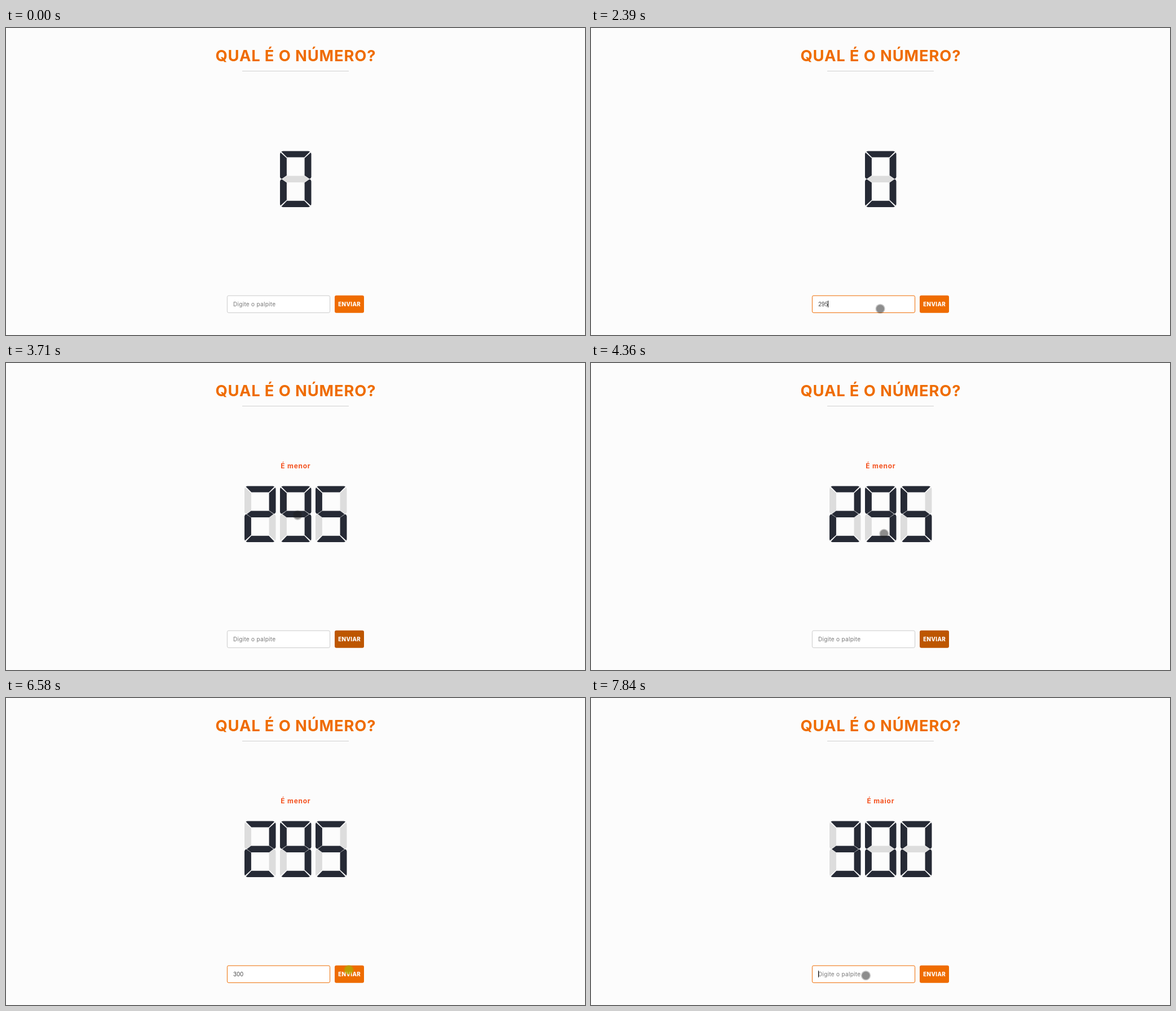
These frames come from a looping animation (1027 by 545 pixels, 8 s). An HTML page with a canvas:

```html
<!DOCTYPE html>
<html lang="pt">
<head>
<meta charset="utf-8">
<title>Qual é o número?</title>
<style>
html, body { margin: 0; width: 100%; height: 100%; overflow: hidden; background: #fcfcfc; }
canvas { display: block; width: 1027px; height: 545px; }
</style>
</head>
<body>
<canvas id="stage"></canvas>
<script>
const W = 1027, H = 545, LOOP = 8000, FADE = 150, CLICK = 75, BLINK = 500;
const canvas = document.getElementById('stage');
const ctx = canvas.getContext('2d');
const ratio = window.devicePixelRatio || 1;
canvas.width = W * ratio;
canvas.height = H * ratio;

const ORANGE = [239, 108, 0], DARK_ORANGE = [189, 86, 0], GREY = [203, 203, 203];
const SEG_ON = '#262a35', SEG_OFF = '#dddddd';

// Each guess: click the field, type, press the button, release to send.
const GUESSES = [
  { focus: 1040, type: 1700, step: 120, press: 2830, send: 2930, text: '295', hint: 'É menor' },
  { focus: 4880, type: 5370, step: 140, press: 6580, send: 6660, text: '300', hint: 'É maior' },
  { focus: 7640, type: LOOP, step: 120, press: LOOP, send: LOOP, text: '', hint: '' }
];

// Pointer moves: where each one ends and how far it bows from a straight line.
const ENTRY = { x: 817, y: 528 };
const MOVES = [
  { start: 290, end: 1160, x: 492, y: 501.5, bowY: -88 },
  { start: 2380, end: 2520, x: 606, y: 485 },
  { start: 2670, end: 3200, x: 603, y: 492 },
  { start: 3430, end: 3990, x: 499, y: 191.5, bowY: 90 },
  { start: 4240, end: 4960, x: 472, y: 494, bowX: 66 },
  { start: 6120, end: 6260, x: 610, y: 477 },
  { start: 6420, end: 6560, x: 608, y: 482.5 },
  { start: 7040, end: 7400, x: 487.5, y: 492.7, bowY: 8 }
];

const GLYPHS = { 0: 'abcdef', 2: 'abged', 3: 'abgcd', 5: 'afgcd', 9: 'abcdfg' };
const DIGIT_W = 55.5, DIGIT_H = 99.5, PITCH = 63;
const TOP = [[2.4, 1], [5, 0], [50.5, 0], [53.1, 1], [43.2, 11.2], [12.3, 11.2]];
const SIDE = [[0.9, 2.6], [11.9, 12.7], [11.9, 43.3], [3.3, 49.3], [1.2, 48.6], [0, 46], [0, 5]];
const MID = [[4, 49.75], [11.7, 44], [43.8, 44], [51.5, 49.75], [43.8, 55.5], [11.7, 55.5]];
const flipX = pts => pts.map(([x, y]) => [DIGIT_W - x, y]);
const flipY = pts => pts.map(([x, y]) => [x, DIGIT_H - y]);
const SEGMENTS = {
  a: TOP, b: flipX(SIDE), c: flipY(flipX(SIDE)), d: flipY(TOP), e: flipY(SIDE), f: SIDE, g: MID
};

const clamp = k => Math.max(0, Math.min(1, k));
const easeOut = k => 1 - Math.pow(1 - clamp(k), 2.5);
const within = (t, a, b) => t >= a && t < b;
const mix = (from, to, k) =>
  `rgb(${from.map((c, i) => Math.round(c + (to[i] - c) * k)).join(',')})`;

function pointerAt(t) {
  let pos = ENTRY;
  for (const { start, end, x, y, bowX = 0, bowY = 0 } of MOVES) {
    if (t < start) break;
    const k = easeOut((t - start) / (end - start));
    const bow = 2 * k * (1 - k);
    pos = { x: pos.x + (x - pos.x) * k + bowX * bow, y: pos.y + (y - pos.y) * k + bowY * bow };
  }
  return pos;
}

function stateAt(t) {
  const guess = GUESSES.filter(g => t >= g.focus).pop();
  const sent = GUESSES.filter(g => t >= g.send).pop();
  const state = { digits: sent ? sent.text : '0', hint: sent ? sent.hint : '',
    typed: '', caret: false, field: 0, button: 0 };
  if (!guess) return state;

  const { focus, type, step, press, send, text } = guess;
  const count = t < type ? 0 : Math.min(text.length, 1 + Math.floor((t - type) / step));
  const lastInput = count ? type + (count - 1) * step : focus;
  if (t < send) state.typed = text.slice(0, count);
  state.caret = t < press && (t - lastInput) % (2 * BLINK) < BLINK;

  const focusIn = easeOut((t - focus) / FADE), focusOut = easeOut((t - press) / FADE);
  state.field = focusIn - focusOut;
  state.button = (guess === GUESSES[0] ? 0 : 1 - focusIn) + focusOut;
  return state;
}

function text(str, x, y, size, weight, color, spacing = 0, centered = false) {
  ctx.font = `${weight} ${size}px Inter, sans-serif`;
  ctx.letterSpacing = spacing + 'px';
  ctx.fillStyle = color;
  const width = ctx.measureText(str).width;
  ctx.fillText(str, centered ? x - (width - spacing) / 2 : x, y);
  return width;
}

function box(x, y, w, h, r) {
  ctx.beginPath();
  ctx.roundRect(x, y, w, h, r);
}

function drawDigit(ch, x, y) {
  for (const [name, pts] of Object.entries(SEGMENTS)) {
    ctx.beginPath();
    pts.forEach(([px, py]) => ctx.lineTo(x + px, y + py));
    ctx.closePath();
    ctx.fillStyle = GLYPHS[ch].includes(name) ? SEG_ON : SEG_OFF;
    ctx.fill();
  }
}

function drawForm({ typed, caret, field, button }) {
  box(392.4, 475.2, 182.2, 30.2, 2.5);
  ctx.fillStyle = '#ffffff';
  ctx.fill();
  ctx.lineWidth = 1;
  ctx.strokeStyle = mix(GREY, ORANGE, field);
  ctx.stroke();

  let width = 0;
  if (typed) width = text(typed, 403, 494, 9.8, 400, '#444444', -0.1);
  else text('Digite o palpite', 403, 494, 10, 400, '#777777', 0.3);
  if (caret) {
    ctx.fillStyle = '#111111';
    ctx.fillRect(Math.floor(403 + width), 484, 1, 12);
  }

  box(583, 474.7, 52, 31.1, 3);
  ctx.fillStyle = mix(ORANGE, DARK_ORANGE, button);
  ctx.fill();
  text('ENVIAR', 609, 494, 9.8, 800, '#ffffff', 0.35, true);
}

function drawPointer(t) {
  // Out of sight before it enters and for a moment on the way in.
  if (t < MOVES[0].start || within(t, 530, 690)) return;
  const { x, y } = pointerAt(t);
  const pressed = GUESSES.some(g => within(t, g.focus, g.focus + CLICK) || within(t, g.press, g.send));
  const tone = pressed ? '170,175,0' : '30,30,30';
  const disc = (r, alpha) => {
    ctx.beginPath();
    ctx.arc(x, y, r, 0, Math.PI * 2);
    ctx.fillStyle = `rgba(${tone},${alpha})`;
    ctx.fill();
  };
  disc(8.6, pressed ? 0.45 : 0.25);
  disc(7, pressed ? 0.5 : 0.34);
}

function draw(t) {
  const state = stateAt(t);
  ctx.setTransform(ratio, 0, 0, ratio, 0, 0);
  ctx.fillStyle = '#fcfcfc';
  ctx.fillRect(0, 0, W, H);

  text('QUAL É O NÚMERO?', 513.5, 59, 27.4, 700, mix(ORANGE, ORANGE, 0), 0.85, true);
  ctx.fillStyle = '#d0d0d0';
  ctx.fillRect(419, 76, 189, 1);

  text(state.hint, 513.5, 187, 11.9, 700, '#f4511e', 0.8, true);
  const left = 486 - PITCH * (state.digits.length - 1) / 2;
  [...state.digits].forEach((ch, i) => drawDigit(ch, left + i * PITCH, 218.4));

  drawForm(state);
  drawPointer(t);
}

const begin = performance.now();
function tick() {
  draw((performance.now() - begin) % LOOP);
  requestAnimationFrame(tick);
}
tick();
</script>
</body>
</html>
```
